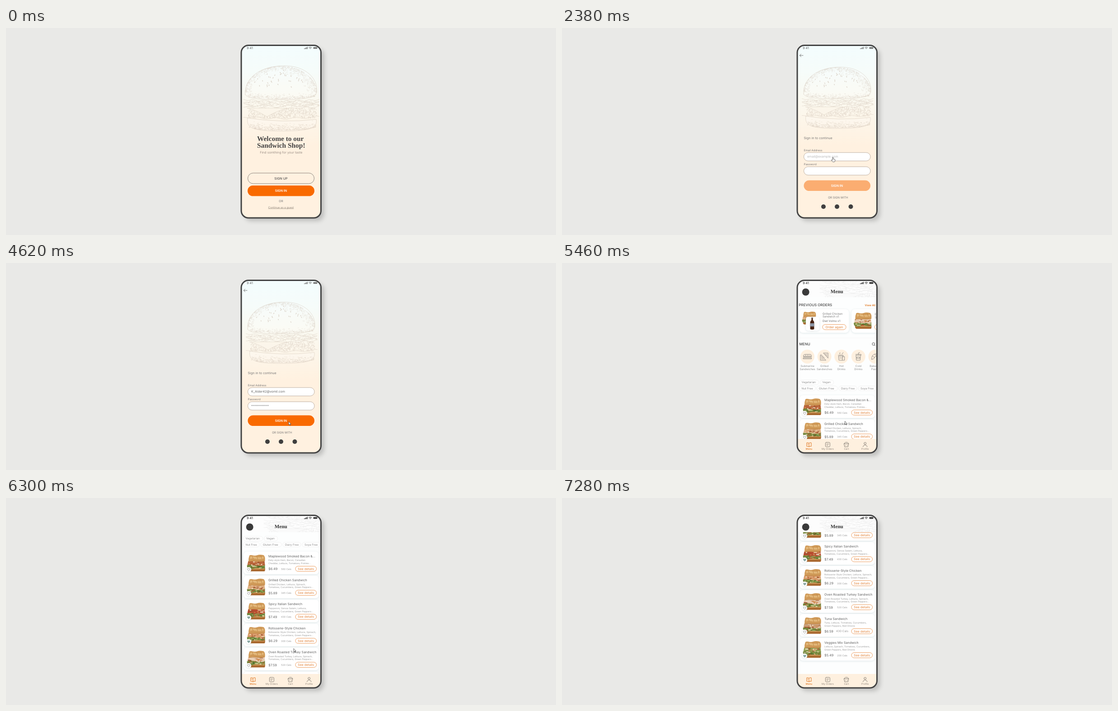
An HTML page that plays this animation: 1218x460 px, repeating every 7420 ms.

```html
<!DOCTYPE html>
<html lang="en">
<head>
<meta charset="utf-8">
<title>Sandwich shop app</title>
<style>
  html, body { margin: 0; width: 100%; height: 100%; overflow: hidden; background: #e9e9e7; }
  svg { display: block; width: 100%; height: 100%; }
  text { font-family: Inter, "Open Sans", sans-serif; text-rendering: geometricPrecision; white-space: pre; }
  .serif { font-family: "Liberation Serif", serif; font-weight: 700; }
  .card { fill: #fff; filter: drop-shadow(0 1px 2px rgba(110, 145, 155, .22)); }
  .line { fill: none; stroke-linecap: round; stroke-linejoin: round; }
</style>
</head>
<body>
<svg id="stage" viewBox="0 0 1218 460"></svg>
<script>
const LOOP = 7420, LEFT = 522, WIDTH = 175;
const ORANGE = '#f96a00', SOFT_ORANGE = '#ea9450', DARK = '#434343', CREAM = '#fef0df';

let seed = 7;
const rnd = (a = 0, b = 1) => {
  seed = (seed * 16807) % 2147483647;
  return a + (b - a) * seed / 2147483647;
};
const list = (n, make) => Array.from({ length: n }, (_, i) => make(i)).join('');
const num = v => v.toFixed(1);

// Markup helpers
const text = (x, y, size, fill, str, more = '') =>
  `<text x="${x}" y="${y}" font-size="${size}" fill="${fill}" ${more}>${str}</text>`;
const mid = (x, y, size, fill, str, more = '') => text(x, y, size, fill, str, `text-anchor="middle" ${more}`);
const rect = (x, y, w, h, r, more) => `<rect x="${x}" y="${y}" width="${w}" height="${h}" rx="${r}" ${more}/>`;
const disc = (x, y, r, more) => `<circle cx="${x}" cy="${y}" r="${r}" ${more}/>`;
const line = (d, color, width = .8, more = '') =>
  `<path class="line" d="${d}" stroke="${color}" stroke-width="${width}" ${more}/>`;
const at = (x, y, body) => `<g transform="translate(${x} ${y})">${body}</g>`;

const statusBar = color => text(533, 46.8, 7, color, '9:41', 'font-weight="500"')
  + list(4, i => rect(660 + i * 2.2, 45.2 - i * 1.1, 1.5, 1.6 + i * 1.1, .3, `fill="${color}"`))
  + line('M670.6 43.4q3.2-2.6 6.4 0M672 45q1.8-1.4 3.6 0', color, 1) + disc(673.8, 46.2, .6, `fill="${color}"`)
  + rect(680.5, 42.5, 8.6, 3.8, 1, `fill="${color}"`) + rect(689.4, 43.6, .7, 1.6, .3, `fill="${color}"`);

const pill = (x, y, w, h, more) => rect(x, y, w, h, h / 2, more);
const outlineButton = (x, y, w, label, size) =>
  pill(x, y, w, 11.6, `fill="#fff" stroke="${SOFT_ORANGE}" stroke-width=".9"`)
  + mid(x + w / 2, y + 8.3, size, '#e28238', label);

// Engraved burger made of outlines and short pen strokes
function burger() {
  const marks = (n, point) => list(n, () => {
    const [x, y, dx, dy] = point();
    return `M${num(x)} ${num(y)}l${num(dx)} ${num(dy)}`;
  });
  const wave = (y, height, period, phase) => 'M' + Array.from({ length: 57 }, (_, i) => {
    const x = 526 + i * 3;
    const sag = 4 * Math.sin((x - 526) / 168 * Math.PI);
    return `${x} ${num(y + sag + height * Math.sin(x / period + phase) + rnd(-.5, .5))}`;
  }).join('L');
  const topBun = 'M530 148C527 112 562 84 616 84C664 84 691 112 688 142C688 154 660 159 615 159C570 159 534 158 530 148Z';
  const lowBun = 'M535 200C532 222 545 229 610 229C676 229 690 221 687 203Q612 212 535 200Z';
  const domeShade = marks(620, () => {
    const a = rnd(Math.PI, 2 * Math.PI), k = 1 - rnd() * rnd() * (Math.cos(a) > 0 ? .34 : .2);
    return [609 + 79 * k * Math.cos(a), 143 + 58 * k * Math.sin(a), -2 * Math.sin(a), 1.4 * Math.cos(a)];
  });
  const rimShade = marks(260, () => {
    const x = rnd(533, 686), sag = 6 * Math.sin((x - 530) / 158 * Math.PI);
    return [x, 152 + sag - 12 * rnd() * rnd(), 2, rnd(-.4, .4)];
  });
  const meat = marks(520, () => [rnd(537, 688), rnd(177, 199), rnd(-1, 2), rnd(1, 3)]);
  const greens = marks(240, () => [rnd(527, 692), rnd(161, 175), rnd(1, 3), rnd(-1, 1)]);
  const lowShade = marks(420, () => {
    const x = rnd(538, 685), edge = Math.abs(x - 611) / 75;
    return [x, 227 - 7 * edge ** 4 - 18 * rnd() * rnd(), 2, rnd(-.3, .3)];
  });
  const seeds = marks(34, () => {
    const a = rnd(Math.PI * 1.05, Math.PI * 1.95), k = Math.sqrt(rnd(.04, .75));
    return [605 + 68 * k * Math.cos(a), 134 + 48 * k * Math.sin(a), rnd(-1.2, 1.2), 1.5];
  });
  const blobs = list(11, i => `M${542 + i * 13.5} ${num(190 + rnd(-3, 3))}q3-7 9-5q1 5-6 8z`);
  const ink = '#cbbcae';
  return `<g id="burger" opacity=".62"><g fill="#fff" fill-opacity=".28"><path d="${topBun}"/><path d="${lowBun}"/></g>`
    + line(topBun + lowBun, ink, .8)
    + line(domeShade + rimShade + lowShade, ink, .45)
    + line(greens + meat, ink, .6)
    + line(wave(159, 1.5, 4, 0) + wave(164, 2, 6, 1) + wave(170, 2.4, 8, 2) + wave(175, 1.6, 5, 4), ink, .7)
    + `<path d="${blobs}" fill="#f8f1e6" stroke="${ink}" stroke-width=".6"/>`
    + `<path d="M534 178Q556 183 578 197Q596 186 622 178Z" fill="#fbf5e9" stroke="${ink}" stroke-width=".6"/>`
    + line(wave(197, 1.8, 7, 1), ink, .7) + line(seeds, ink, 1.5) + '</g>';
}

const backdrop = rect(LEFT, 38, WIDTH, 386, 0, 'fill="url(#sky)"');

function welcome() {
  return backdrop + statusBar('#777') + '<use href="#burger"/>'
    + text(556, 251, 15.4, DARK, 'Welcome to our', 'class="serif"')
    + text(556, 266.3, 15.4, DARK, 'Sandwich Shop!', 'class="serif"')
    + mid(609.3, 279, 7.1, '#9b9087', 'Find somthing for your taste')
    + pill(535.5, 322.3, 147, 23.6, 'fill="none" stroke="#8b857e"')
    + mid(609, 336.9, 7.2, '#555', 'SIGN UP', 'font-weight="500"')
    + pill(535, 350, 148, 23.6, `fill="${ORANGE}"`)
    + mid(609, 364.4, 7.1, '#fff', 'SIGN IN', 'font-weight="600"')
    + mid(609, 386.8, 6.6, '#777', 'OR')
    + mid(609, 400.5, 6, '#8f857b', 'Continue as a guest', 'text-decoration="underline"');
}

function signIn() {
  const field = y => pill(535.5, y, 147.5, 18.6, 'fill="#fff" stroke="#b8a99a" stroke-width=".9"');
  return backdrop + statusBar('#777') + line('M534 61H526.5M529.5 58L526.3 61L529.5 64', '#555')
    + '<use href="#burger" transform="translate(609.5 155) scale(.94) translate(-609 -156.5)"/>'
    + text(535.5, 246.5, 7.2, '#777', 'Sign in to continue')
    + text(535.5, 274, 6.1, '#777', 'Email Address') + field(276.8)
    + text(543, 288.4, 7, '#666', '', 'id="email"')
    + text(535.5, 305.2, 6.1, '#777', 'Password') + field(308.3)
    + text(543, 320.4, 6.5, '#777', '', 'id="password"')
    + pill(535.5, 338.5, 147.5, 23.6, 'id="submit"')
    + mid(609, 353, 7.1, '#fff', 'SIGN IN', 'font-weight="600"')
    + mid(611.3, 378.7, 6.3, '#777', 'OR SIGN WITH')
    + [579, 609, 639.5].map(x => disc(x, 397, 5, 'fill="#3f3f3f"')).join('');
}

// Flat sandwich in a 40 by 37 box
function sandwich(x, y, filling, scale = 1) {
  const scatter = (n, colors, top, bottom) => list(n, i =>
    `<ellipse cx="${num(rnd(4, 37))}" cy="${num(rnd(top, bottom))}" rx="${num(rnd(1.5, 4))}" ry="${num(rnd(.6, 1.4))}" fill="${colors[i % colors.length]}"/>`);
  return `<g transform="translate(${x} ${y}) scale(${scale})">`
    + '<path d="M3 29H40Q41 35 39 37H6Q2 35 3 29Z" fill="#a9682f"/><path d="M4 30H39V32.5H4Z" fill="#cf9a5c"/>'
    + '<path d="M0 24Q6 19 13 21T27 21T40 22V30Q34 32 28 30T15 31T1 29Z" fill="#74873c"/>'
    + `<path d="M3 14H39L40 23Q30 27 20 24T1 23Z" fill="${filling}"/>`
    + scatter(26, [filling, '#f0dcc0', '#9c5230', '#d08a52'], 16, 24)
    + scatter(18, ['#93a95a', '#55702d', '#b8502f', '#dcd3a8'], 24.5, 30)
    + '<path d="M5 4Q5 0 11 1Q18 3 23 1T37 1Q41 4 40 14Q30 17 20 15T4 16Q3 9 5 4Z" fill="#d09a58"/>'
    + '<path d="M7 4Q13 3 21 5T37 4V9Q26 11 18 9T7 10Z" fill="#e2b779"/>'
    + line('M12 4l2 5M22 4l2 6M31 3l2 6M5 15Q20 14 39 14', '#b97d3e', .8) + '</g>';
}

const HEART = 'M0 2.8C-5-.4-2.6-4 0-1.5C2.6-4 5-.4 0 2.8Z';
const veg = 'Tomatoes, Cucumbers, Green Peppers...';
const dishes = [
  ['Maplewood Smoked Bacon &amp;...', 'Dely-style Ham, Bacon, Canadian', 'Cheddar, Lettuce, Tomatoes, Pickles...', '6.49', 560, '#b9633a'],
  ['Grilled Chicken Sandwich', 'Grilled Chicken, Lettuce, Spinach,', veg, '5.89', 345, '#dfb083'],
  ['Spicy Italian Sandwich', 'Pepperoni, Genoa Salami, Lettuce,', veg, '7.49', 430, '#b84a2f', true],
  ['Rotisserie-Style Chicken', 'Rotisserie-Style Chicken, Lettuce, Spinach,', veg, '6.29', 300, '#d99c6c', true],
  ['Oven Roasted Turkey Sandwich', 'Oven Roasted Turkey, Lettuce, Spinach,', veg, '7.59', 520, '#e6c9b0'],
  ['Tuna Sandwich', 'Tuna, Lettuce, Tomatoes, Cucumbers,', 'Green Peppers, Red Onions', '6.59', 430, '#c9a07c'],
  ['Veggies Mix Sandwich', 'Lettuce, Spinach, Tomatoes, Cucumbers,', 'Green Peppers, Red Onions', '5.49', 200, '#8fa052', true],
];

const dishCard = ([name, first, second, price, cals, filling, liked], i) => at(0, 294 + i * 53.35,
  rect(526, 0, 167, 50.5, 8, 'class="card"') + sandwich(533.5, 7, filling)
  + disc(537.5, 40, 5.6, 'class="card"')
  + at(537.5, 40, `<path d="${HEART}" fill="${liked ? '#87a6a2' : 'none'}" stroke="${liked ? '#87a6a2' : '#666'}" stroke-width=".7"/>`)
  + text(581, 12.8, 7.1, '#606060', name)
  + text(581, 21.3, 5.2, '#999', first) + text(581, 27.9, 5.2, '#999', second)
  + text(581, 41.2, 7.3, '#666', '$' + price)
  + mid(620.5, 40.6, name[0] === 'T' ? 6.4 : 5.4, '#999', cals + ' Cals')
  + outlineButton(641, 32.5, 46.5, 'See details', 6.9));

const categories = [
  ['Submarine', 'Sandwiches', 'M-9-1Q-9-5-5-5H6Q9-5 9-1ZM-9 1H9M-9 3H9V5H-9ZM-5-3H-3M0-3H2M5-3H6'],
  ['Grilled', 'Sandwiches', 'M-2-8H8V3ZM1-6L6-1M4-6L6-4M-9-3V8H3ZM-7 1L-2 6M-7 4L-5 6M-8-5L0 3'],
  ['Hot', 'Drinks', 'M-6-1H3L2 8H-5ZM-7-3H4V-1M3 0H7V8H2M-3-5Q-5-7-3-9M1-5L4-9M-4 3H2'],
  ['Cold', 'Drinks', 'M-5-3H5L4 8H-4ZM-6-5H6V-3M0-5V-8L3-9M-3 1H3V4H-3Z'],
  ['Bakery &amp;', 'Pastry', 'M-8 6Q-9-5 1-6Q8-6 8 0Q1-3-2 2Q-3 6-8 6ZM-6-1L-2 2M-1-5L1-2'],
];
const chip = (x, y, width, label) =>
  rect(x - 5, y - 7.4, width, 10.4, 5, 'fill="#fff" stroke="#ebebeb" stroke-width=".7"')
  + text(x, y, 6.2, '#8c8c8c', label);

function menu() {
  const bottle = at(554, 121, '<path d="M-1.6 0H1.6V6Q5 9 4.4 13V26Q0 28-4.4 26V13Q-5 9-1.6 6Z" fill="#4a2616"/>'
    + '<path d="M-4.4 13H4.4V20H-4.4Z" fill="#8a95a5"/><path d="M-1.7 0H1.7V2H-1.7Z" fill="#777"/>');
  const content = text(524.5, 96, 7.9, '#444', 'PREVIOUS ORDERS', 'font-weight="500"')
    + text(694, 95.6, 6, '#df7620', 'View All', 'text-anchor="end" font-weight="600"')
    + rect(525.5, 102.5, 110, 52.5, 8, 'class="card"') + rect(641, 102.5, 110, 52.5, 8, 'class="card"')
    + sandwich(531.5, 108, '#dfb083', .77) + rect(540, 119.5, 30, 31, 5, 'class="card"') + bottle
    + text(577, 114.5, 6.2, '#777', 'Grilled Chicken') + text(577, 121.4, 6.2, '#777', 'Sandwich x1')
    + text(577, 130.8, 6.2, '#666', 'Diet Volmo x1') + outlineButton(577, 136.6, 52, 'Order again', 7)
    + sandwich(646, 110, '#e6c9b0', .98) + text(692.5, 116, 6.2, '#777', 'Egg') + text(692.5, 123, 6.2, '#777', 'Sandwich')
    + outlineButton(692.5, 136.6, 52, '', 7)
    + rect(LEFT, 166, WIDTH, 1, 0, 'fill="#f7f7f7"')
    + text(525.5, 183, 8, '#444', 'MENU', 'font-weight="500"')
    + disc(689.8, 180, 2.9, 'fill="none" stroke="#444" stroke-width=".9"') + line('M692 182.3L693.5 184', '#444', .9)
    + categories.map(([top, bottom, icon], i) => at(543.5 + i * 37.6, 208,
        disc(0, 0, 15.5, `fill="${CREAM}"`) + line(icon, '#666', .7)
        + mid(0, 22.9, 6, '#8c8c8c', top) + mid(0, 29.8, 6, '#8c8c8c', bottom))).join('')
    + chip(530.5, 267.4, 43, 'Vegetarian') + chip(576.5, 267.4, 30, 'Vegan')
    + chip(530.5, 280.8, 36, 'Nut Free') + chip(569, 280.8, 46, 'Gluten Free')
    + chip(618, 280.8, 40, 'Dairy Free') + chip(661, 280.8, 40, 'Soya Free')
    + dishes.map(dishCard).join('');
  const tabs = [
    ['Menu', 'M0-3Q-2-5-5-4V4Q-2 3 0 5Q2 3 5 4V-4Q2-5 0-3V5M-3-1H-2'],
    ['My Orders', 'M-3-5H3Q5-5 5-3V3Q5 5 3 5H-3Q-5 5-5 3V-3Q-5-5-3-5ZM-2.5-1.5H2.5M-2.5 1.5H1'],
    ['Cart', 'M-5-2H5L3.5 5H-3.5ZM-5-2L-3-4.5M5-2L3-4.5M-2-5H2M-2 1V2M2 1V2'],
    ['Profile', 'M-2.4-2.6A2.4 2.4 0 1 1 2.4-2.6A2.4 2.4 0 1 1-2.4-2.6M-4.6 5Q-4 1 0 1T4.6 5'],
  ];
  return rect(LEFT, 38, WIDTH, 386, 0, 'fill="#fdfefe"')
    + `<g id="scroller">${content}</g>`
    + `<g clip-path="url(#header)">${rect(LEFT, 38, WIDTH, 38, 0, 'fill="#fdfdfd"')}`
    + '<use href="#burger" transform="translate(45 -110)" opacity=".45" style="filter:grayscale(1)"/></g>'
    + statusBar('#333') + disc(539.7, 64.5, 8, 'fill="#3a3a3a"')
    + mid(608.8, 66.6, 11.2, '#333', 'Menu', 'class="serif"')
    + rect(LEFT, 391, WIDTH, 33, 0, `fill="${CREAM}"`)
    + tabs.map(([label, icon], i) => at(547 + i * 41.4, 403.5, line(icon, i ? '#6b655f' : '#df7620', i ? .8 : 1)
        + mid(0, 11.9, 5.4, i ? '#91877d' : '#df7620', label, i ? '' : 'font-weight="500"'))).join('');
}

const frame = more => rect(521, 38.5, 176.5, 383.6, 16, more);
const stage = document.getElementById('stage');
stage.innerHTML = `<defs>
    <linearGradient id="sky" x2="0" y2="1"><stop stop-color="#f3fdfe"/><stop offset=".15" stop-color="#f6fcfa"/>
      <stop offset=".32" stop-color="#fbf9f0"/><stop offset=".58" stop-color="#fff1e0"/></linearGradient>
    <clipPath id="screen">${frame('')}</clipPath>
    <clipPath id="header">${rect(LEFT, 38, WIDTH, 38, 0, '')}</clipPath>${burger()}</defs>`
  + frame('fill="#eee" style="filter:drop-shadow(7px 7px 5px rgba(0,0,0,.18))"')
  + `<g clip-path="url(#screen)"><g id="welcome">${welcome()}</g><g id="signIn">${signIn()}</g><g id="menu">${menu()}</g>`
  + `<g id="cursor" fill="#fff" stroke="#444" stroke-width=".8" stroke-linejoin="round">
      <path id="arrow" d="M0 0V7.2L1.7 5.7L2.8 8.3L4 7.8L2.9 5.3H5.2Z"/>
      <path id="hand" d="M-1 5V.5a.9.9 0 0 1 1.8 0V3.5l3.2.8q.9.3.8 1.2l-.5 3q-.2 1.6-1.8 1.6h-2q-1 0-1.6-.8l-2.6-3.4q.8-1.2 2.7.4Z"/></g></g>`
  + frame(`fill="none" stroke="${DARK}" stroke-width="3"`);

const el = Object.fromEntries([...stage.querySelectorAll('[id]')].map(node => [node.id, node]));
const progress = (t, start, length) => Math.min(1, Math.max(0, (t - start) / length));
const easeOut = (p, power) => 1 - (1 - p) ** power;
const smooth = p => p * p * (3 - 2 * p);
const show = (node, on) => node.setAttribute('display', on ? 'inline' : 'none');

// Cursor stops: time, x, y
const stops = [[140, 690, 409], [820, 658, 362], [1480, 658, 362], [2240, 600, 287.5], [3400, 600, 287.5],
  [3640, 601, 314], [4120, 601, 314], [4460, 626, 352.5], [5400, 626, 352.5], [5880, 637, 334.5], [LOOP, 637, 334.5]];
function cursorAt(t) {
  const i = Math.max(1, stops.findIndex(stop => stop[0] > t));
  const [t0, x0, y0] = stops[i - 1], [t1, x1, y1] = stops[i];
  const p = smooth(progress(t, t0, t1 - t0));
  return [x0 + (x1 - x0) * p, y0 + (y1 - y0) * p];
}

// The next screen slides over; the one below drifts left and fades.
function slide(below, above, p) {
  below.setAttribute('transform', `translate(${-.26 * WIDTH * p} 0)`);
  below.setAttribute('opacity', 1 - .4 * p);
  above.setAttribute('transform', `translate(${WIDTH * (1 - p)} 0)`);
  show(below, p < 1);
  show(above, p > 0);
}

function typed(node, str, p) {
  node.textContent = str.slice(0, Math.round(str.length * p));
}

function draw(t) {
  const toSignIn = easeOut(progress(t, 1040, 450), 2);
  const toMenu = easeOut(progress(t, 4880, 450), 2);
  slide(el.welcome, el.signIn, toSignIn);
  if (toMenu > 0) slide(el.signIn, el.menu, toMenu);
  else {
    el.signIn.setAttribute('opacity', 1);
    show(el.menu, false);
  }

  const editing = t >= 2600;
  typed(el.email, editing ? 'K_Alder42@vomil.com' : 'email@example.com', editing ? progress(t, 2600, 400) : 1);
  el.email.setAttribute('fill', editing ? '#666' : '#b8b8b8');
  typed(el.password, '*'.repeat(12), progress(t, 3700, 300));
  el.submit.setAttribute('fill', t < 4000 ? '#fbad71' : ORANGE);

  el.scroller.setAttribute('transform', `translate(0 ${-303 * easeOut(progress(t, 6100, 805), 3)})`);

  const [x, y] = cursorAt(t);
  const overField = t > 1500 && t < 4300 && y > 276 && y < 327;
  el.cursor.setAttribute('transform', `translate(${x} ${y})`);
  show(el.cursor, t >= 140 && t < 6860);
  show(el.arrow, !overField);
  show(el.hand, overField);
}

const begin = performance.now();
function tick() {
  draw((performance.now() - begin) % LOOP);
  requestAnimationFrame(tick);
}
tick();
</script>
</body>
</html>
```
